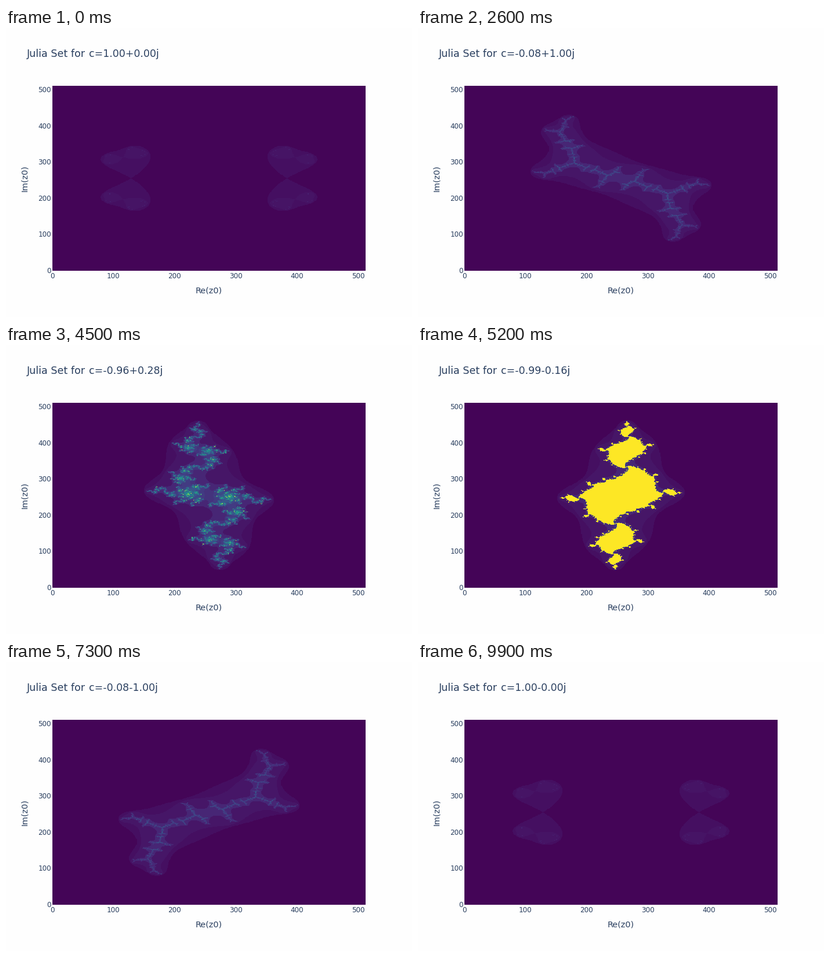
A matplotlib script that plays this animation: 700 by 500 pixels, repeating every 10000 ms.

```python
import numpy as np
import matplotlib.pyplot as plt
from matplotlib.animation import FuncAnimation

W, H, DPI = 700, 500, 100
LEFT, RIGHT, TOP, BOTTOM = 80, 620, 100, 420
PW, PH = RIGHT - LEFT, BOTTOM - TOP
N, MAX_ITER, FRAMES = 512, 100, 100
INK, PAPER = "#2a3f5f", "#fefefe"

VIRIDIS = ["440154", "482878", "3e4989", "31688e", "26828e",
           "1f9e89", "35b779", "6ece58", "b5de2b", "fde725"]

# Colour of every escape count; close shades share one averaged tone.
stops = np.array([[int(h[i:i + 2], 16) for i in (0, 2, 4)] for h in VIRIDIS])
levels = np.linspace(0, 1, MAX_ITER + 1)
shades = np.column_stack([np.interp(levels, np.linspace(0, 1, len(stops)), ch)
                          for ch in stops.T]).round().astype(int)
keys = (shades[:, 0] >> 5) * 256 + (shades[:, 1] >> 4) * 16 + (shades[:, 2] >> 5)
_, group = np.unique(keys, return_inverse=True)

# The real axis runs upwards, the imaginary axis to the right.
# Cell edges that fall on a pixel centre round right and down.
axis = np.linspace(-2, 2, N)
cols = np.ceil((np.arange(PW) + 0.5) * N / PW).astype(int) - 1
rows = np.floor((np.arange(PH) + 0.5) * N / PH).astype(int)[::-1]
Z0 = (axis[rows][:, None] + 1j * axis[cols][None, :]).ravel()
PATH = np.exp(1j * np.linspace(0, 2 * np.pi, FRAMES))


def escape_counts(c):
    counts = np.zeros(Z0.size, int)
    idx, z = np.arange(Z0.size), Z0
    for _ in range(MAX_ITER):
        inside = z.real ** 2 + z.imag ** 2 < 4
        idx, z = idx[inside], z[inside]
        if not idx.size:
            break
        counts[idx] += 1
        z = z * z + c
    return counts


def julia_image(c):
    counts = escape_counts(c)
    pop = np.bincount(counts, minlength=MAX_ITER + 1)
    total = np.maximum(np.bincount(group, pop), 1)
    tones = np.column_stack([np.bincount(group, pop * ch) / total
                             for ch in shades.T])
    return tones.astype(np.uint8)[group[counts]].reshape(PH, PW, 3)


plt.rcParams["font.family"] = "DejaVu Sans"
fig = plt.figure(figsize=(W / DPI, H / DPI), dpi=DPI, facecolor=PAPER)
ax = fig.add_axes([0, 0, 1, 1])
ax.axis("off")


def label(x, y, text, px, **kw):
    return ax.text(x, y, text, fontsize=px * 72 / DPI, color=INK,
                   va="baseline", **kw)


picture = ax.imshow(julia_image(PATH[0]), extent=(LEFT, RIGHT, BOTTOM, TOP),
                    interpolation="nearest", aspect="auto")
ax.set_xlim(0, W)
ax.set_ylim(H, 0)

for v in range(0, 501, 100):
    label(LEFT + v * PW / N, 433, str(v), 12, ha="center")
    label(78, BOTTOM - (v + 0.5) * PH / N + 4.3, str(v), 12, ha="right")
label(350, 459, "Re(z0)", 14.4, ha="center")
label(36, 260, "Im(z0)", 14.4, ha="center", rotation=90,
      rotation_mode="anchor")
label(35.4, 50, "Julia Set for", 17.5)
value = label(142.6, 50, "", 17.4)


def draw(i):
    c = PATH[i]
    picture.set_data(julia_image(c))
    value.set_text(f"c={c:.2f}")
    return picture, value


anim = FuncAnimation(fig, draw, frames=FRAMES, interval=100, repeat=True,
                     repeat_delay=0, blit=False)
plt.show()
```
